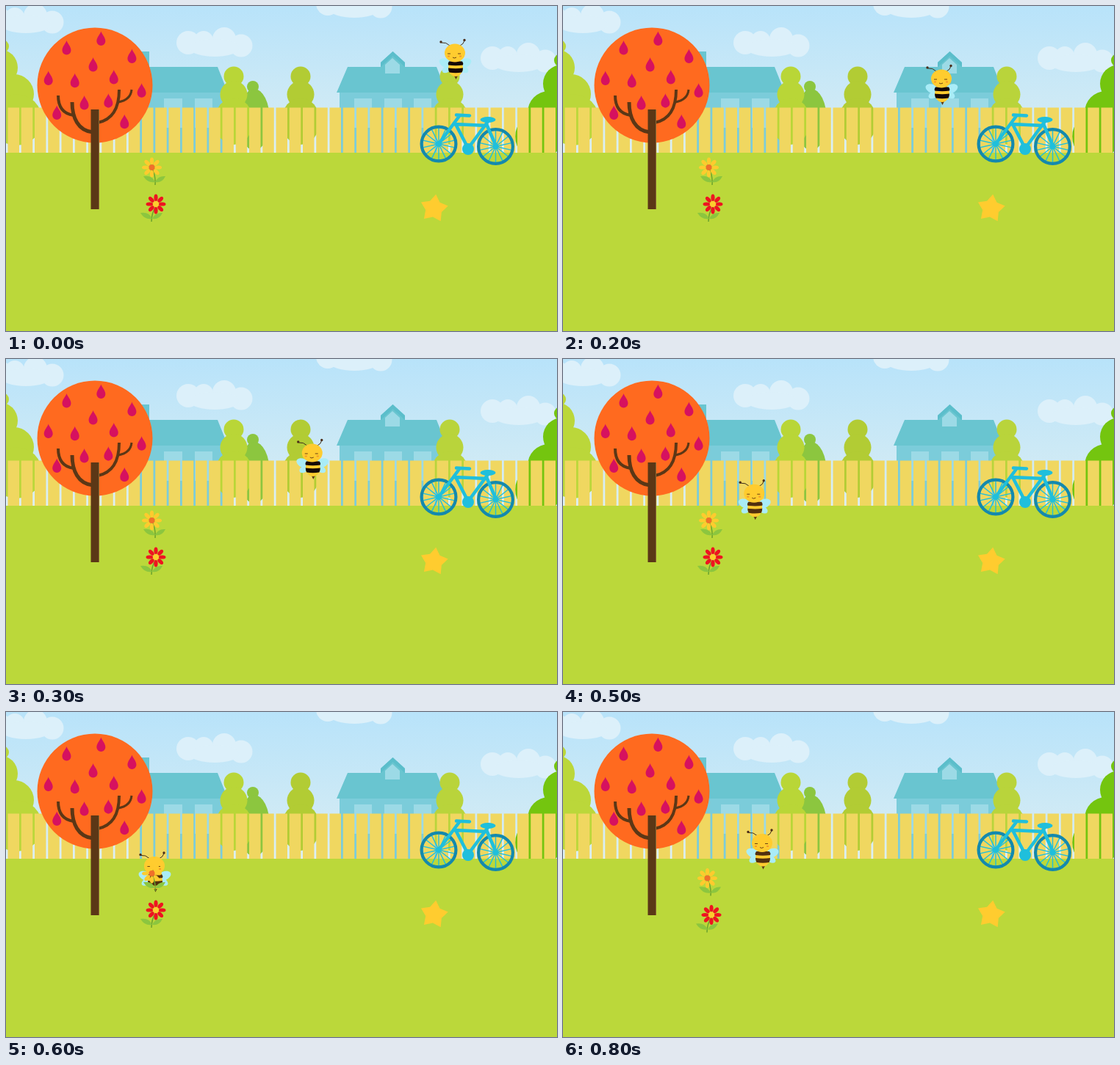
Write an HTML page that moves like this. It is 750 px wide and 443 px high and loops after 0.9 s.

```html
<!DOCTYPE html>
<html lang="en">
<head>
<meta charset="utf-8">
<title>Bee in the garden</title>
<style>
  html, body { margin: 0; width: 100%; height: 100%; overflow: hidden; background: #bbd83a; }
  svg { display: block; width: 750px; height: 443px; }
</style>
</head>
<body>
<svg viewBox="0 0 750 443">
  <defs>
    <linearGradient id="sky" x2="0" y2="1">
      <stop stop-color="#b8e3fa"/><stop offset=".7" stop-color="#cfeaf5"/><stop offset="1" stop-color="#dcf0f5"/>
    </linearGradient>
    <g id="cloud" fill="#dcf0fa">
      <circle cx="248" cy="50" r="16"/><circle cx="269" cy="47" r="13"/>
      <circle cx="297" cy="45" r="16"/><circle cx="320" cy="54" r="15.500"/>
      <ellipse cx="284" cy="57" rx="34" ry="12"/>
    </g>
    <g id="bush">
      <circle cy="96" r="13.500"/><circle cy="120.500" r="18.500"/><ellipse cy="157" rx="26" ry="32"/>
    </g>
    <path id="drop" fill="#d6115f" d="M0-10C1-6 6-2 6 3.500A6 6 0 0 1-6 3.500C-6-2-1-6 0-10Z"/>
    <path id="leaves" d="M0 0Q-4-10-16-8Q-10 2 0 0ZM0 0Q4-9 14-8Q9 2 0 0Z" fill="#8cc63f"/>
    <g id="wheel"></g>
    <g id="wing" fill="#a9ecf7">
      <ellipse rx="10" ry="6" transform="translate(13 14) rotate(-24)"/>
      <ellipse rx="7" ry="4.500" transform="translate(12 22) rotate(32)"/>
    </g>
  </defs>

  <rect width="750" height="200" fill="url(#sky)"/>
  <use href="#cloud"/><use href="#cloud" x="-257" y="-32"/>
  <use href="#cloud" x="190" y="-53"/><use href="#cloud" x="414" y="21"/>

  <g id="houses">
    <path fill="#7bccda" d="M180 118H297V200H180ZM454 118H596V200H454Z"/>
    <path fill="#9cdae6" d="M215 126h25v40h-25zM257 126h24v40h-24zM474 126h24v40h-24zM515 126h24v40h-24zM555 126h24v40h-24z"/>
    <path fill="#69c5d0" d="M180 62H195V83H288L302 118H180ZM465 83H586L600 118H450ZM510 84V77L526.500 62L543 77V84Z"/>
    <path fill="#5bbecb" d="M510 77L526.500 62L543 77V83L526.500 68L510 83Z"/>
    <path fill="#9cdae6" d="M516 92V80L526 71L536 80V92Z"/>
  </g>

  <g id="plants">
    <g fill="#8cc63f"><circle cx="336" cy="110" r="8"/><ellipse cx="338" cy="155" rx="21" ry="42"/></g>
    <use href="#bush" x="310" fill="#b9d637"/>
    <use href="#bush" x="401" fill="#b2cc34"/>
    <use href="#bush" x="604" fill="#b9d43b"/>
    <g fill="#bbd73a">
      <circle cx="-5" cy="55" r="9"/><circle cx="-9" cy="84" r="25"/>
      <circle cx="11" cy="120" r="27"/><circle cx="14" cy="155" r="35"/>
    </g>
    <g fill="#74c50f">
      <circle cx="755" cy="74" r="9"/><circle cx="757" cy="106" r="26"/>
      <circle cx="739" cy="145" r="29"/><circle cx="725" cy="178" r="32"/>
    </g>
  </g>
  <g id="fence" fill="#f0d760"></g>
  <rect y="200" width="750" height="243" fill="#bbd83a"/>

  <g id="tree">
    <circle cx="121" cy="108" r="78.500" fill="#ff6a1f"/>
    <g fill="none" stroke="#5b3716">
      <path stroke-width="5" d="M118 172C98 170 90 152 90 131"/>
      <path stroke-width="4" d="M92 149C78 147 71 138 71 122M125 159C145 155 154 140 154 114"/>
      <path stroke-width="3" d="M153 131C164 129 170 124 171 114"/>
    </g>
    <path fill="#5b3716" d="M115.500 141H126V277H115.500Z"/>
    <path fill="#8a6a34" d="M126 141H127V277H126Z"/>
  </g>

  <g id="bike" fill="none" stroke="#1fbfdc" stroke-linecap="round" stroke-linejoin="round">
    <use href="#wheel" x="589" y="188"/><use href="#wheel" x="666.500" y="191.500"/>
    <path stroke-width="4.500" d="M613 148.500L631 149.500M617 150L589 188M610 161L654 163M612 161L629 194L657 156M654 161L667 191"/>
    <ellipse cx="656" cy="155" rx="10.500" ry="4" fill="#1fbfdc" stroke="none"/>
    <circle cx="629" cy="195" r="8" fill="#1fbfdc" stroke="none"/>
  </g>

  <polygon id="star" fill="#ffcc2f"/>

  <g id="bee">
    <use href="#wing"/><use href="#wing" transform="translate(1) scale(-1 1)"/>
    <path fill="#5d3a14" d="M-2 29H5L1.500 36Z"/>
    <ellipse cx="1" cy="20" rx="10" ry="12" fill="#ffcc2f"/>
    <path id="stripes" d="M-8 11.500H10Q12 14 11 16.500Q1 18-9 16.500Q-10 14-8 11.500ZM-9 20.500Q1 22 11 20.500Q11 24 9.500 26.500Q1 28-7.500 26.500Q-9 24-9 20.500Z"/>
    <path fill="none" stroke="#3d2c18" d="M-7-10Q-12-15-18-14M7-10Q12-12 13-17"/>
    <circle cx="-19" cy="-15" r="1.700" fill="#4a2c18"/><circle cx="13" cy="-17.500" r="1.700" fill="#4a2c18"/>
    <ellipse rx="14" ry="12.500" fill="#ffcc2f"/>
    <path fill="none" stroke="#6b4212" d="M-10 1H-6M4 1H8M-3 6Q-1 8 2 6"/>
    <path fill="none" stroke="#f59a2a" stroke-width="2" d="M-10 4.500H-7M6 4.500H9"/>
  </g>

  <g id="flowers">
    <path fill="none" stroke="#6ba32e" stroke-width="1.500" d="M199 222Q204 232 203 244M204 274Q198 282 198 294"/>
    <use href="#leaves" x="203" y="240"/><use href="#leaves" x="199" y="290"/>
  </g>
</svg>
<script>
const $ = id => document.getElementById(id);
const repeat = (id, n, markup) => {
  for (let i = 0; i < n; i++) $(id).insertAdjacentHTML('beforeend', markup(i));
};
const polar = (x, y, r, degrees) => {
  const a = degrees * Math.PI / 180;
  return [x + r * Math.cos(a), y + r * Math.sin(a)];
};

repeat('fence', 41, i => `<rect x="${2.5 + 18.25 * i}" y="138.5" width="15.5" height="61.5"/>`);

// Fruit hangs in two rings; the outer one leaves room for the trunk
const fruitRing = (n, r, start, gap) => repeat('tree', n, i => {
  const [x, y] = polar(121, 108, r, start + gap * i);
  return `<use href="#drop" x="${x}" y="${y}"/>`;
});
fruitRing(5, 28, 49, 72);
fruitRing(7, 64, 144, 44.5);

repeat('wheel', 14, i => `<path stroke-width="1.4" d="M0 0V-22" transform="rotate(${i * 360 / 14})"/>`);
repeat('wheel', 1, () => '<circle r="23.4" stroke="#1489ad" stroke-width="4.2"/><circle r="3.5" fill="#1fbfdc"/>');

function flower(x, y, petal, heart) {
  repeat('flowers', 8, i =>
    `<ellipse cy="-8.7" rx="2.6" ry="4.8" fill="${petal}" transform="translate(${x} ${y}) rotate(${i * 45})"/>`);
  repeat('flowers', 1, () => `<circle cx="${x}" cy="${y}" r="4" fill="${heart}"/>`);
}
flower(198.5, 220, '#ffcb2e', '#f0702a');
flower(204, 270, '#ee1420', '#ffcb2e');

$('star').setAttribute('points',
  Array.from({ length: 10 }, (_, i) => polar(582.5, 276, i % 2 ? 11.5 : 19.5, 36 * i - 82)).join(' '));

const STEP = 100, LOOP = 900;
const beeStops = [[611, 64], [515, 99], [318.5, 157], [202, 209.5], [271, 178.5]]; // two steps apart
const move = (id, x, y) => $(id).setAttribute('transform', `translate(${x} ${y})`);

function draw() {
  const step = Math.floor(performance.now() % LOOP / STEP);
  const from = beeStops[Math.floor(step / 2)], to = beeStops[Math.ceil(step / 2)];
  move('bee', (from[0] + to[0]) / 2, (from[1] + to[1]) / 2);
  $('stripes').setAttribute('fill', step < 5 ? '#140806' : '#51300f');
  move('flowers', ...(step > 6 ? [-2, 6.5] : [0, 0]));
  requestAnimationFrame(draw);
}
draw();
</script>
</body>
</html>
```
